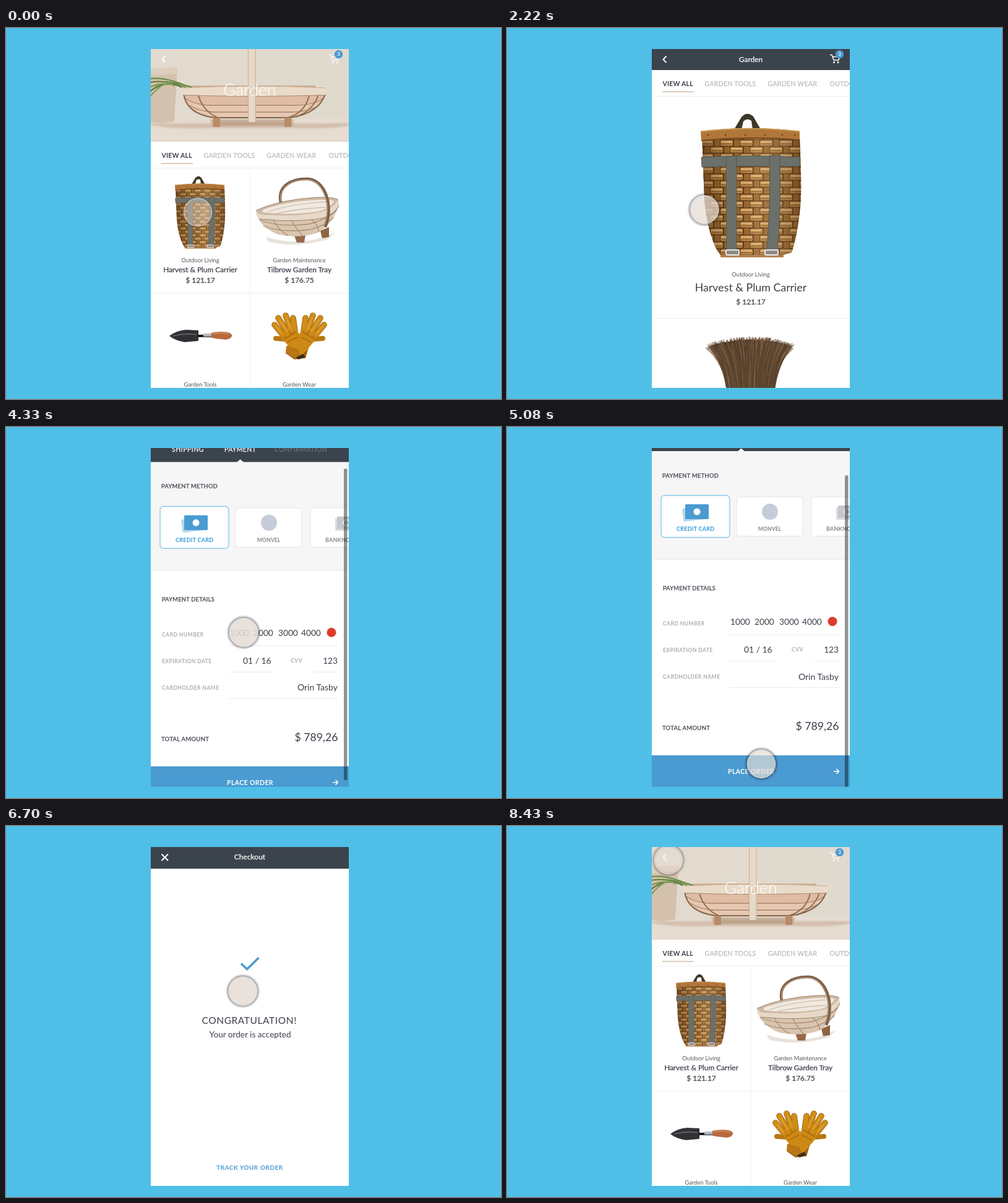
Write an HTML page that moves like this. It is 800 px wide and 600 px high and loops after 9.42 s.

```html
<!DOCTYPE html>
<html lang="en">
<head>
<meta charset="utf-8">
<title>Garden shop</title>
<style>
html, body { margin: 0; width: 100%; height: 100%; overflow: hidden; background: #4fbfe8; }
svg { display: block; width: 800px; height: 600px; }
text { font-family: Lato, "Open Sans", sans-serif; fill: currentColor; white-space: pre; }
.b { font-weight: 700; }
.l { font-weight: 300; }
.s { stroke: currentColor; stroke-width: .25px; }
.m { text-anchor: middle; }
.e { text-anchor: end; }
</style>
</head>
<body>
<svg id="stage" viewBox="0 0 800 600"></svg>
<script>
const LOOP = 9420;
const INK = '#3b4049', BAR = '#3b434d', BLUE = '#4a9bd1', WHITE = '#fff', PALE = '#bdbcbb', BEIGE = '#e6ddd4';

// ---------- markup helpers ----------
const T = (x, y, size, str, color = INK, cls = '', ls = 0) =>
  `<text x="${x}" y="${y}" font-size="${size}" color="${color}" class="${cls}" letter-spacing="${ls}">${str}</text>`;
const R = (x, y, w, h, fill, more = '') =>
  `<rect x="${x}" y="${y}" width="${w}" height="${h}" fill="${fill}" ${more}/>`;
const C = (x, y, r, fill, more = '') => `<circle cx="${x}" cy="${y}" r="${r}" fill="${fill}" ${more}/>`;
const P = (d, fill, more = '') => `<path d="${d}" fill="${fill}" ${more}/>`;
const L = (d, stroke, w = 1, more = '') =>
  `<path d="${d}" fill="none" stroke="${stroke}" stroke-width="${w}" ${more}/>`;
const ROUND = 'stroke-linecap="round" stroke-linejoin="round"';

let seed = 7;
const rnd = () => (seed = seed * 16807 % 2147483647) / 2147483647;

// ---------- shared parts ----------
const cart = alpha => `<g opacity="${alpha}">` +
  L('M522 43.5h3l3.2 8.5h7.6l2.2-5.5h-11', WHITE, 1.6) +
  C(528.5, 55.5, 1.5, WHITE) + C(535, 55.5, 1.5, WHITE) + '</g>' +
  C(537.5, 42.5, 6.7, BLUE) + T(537.5, 45.3, 8, '3', WHITE, 'b m');
const back = L('M257.5 45.5l-5 5.3 5 5.3', WHITE, 2);
const cross = L('M251.5 45.5l10.5 10.5M262 45.5l-10.5 10.5', WHITE, 2);
const topBar = h => R(234, 14, 320, h - 14, BAR);

const tabs = y => R(234, y - 22, 320, 42, WHITE) +
  T(251.5, y + 4, 10.5, 'VIEW ALL', INK, 'b', .2) +
  T(319.5, y + 4, 10.5, 'GARDEN TOOLS', PALE, 's', .3) +
  T(421.5, y + 4, 10.5, 'GARDEN WEAR', PALE, 's', .3) +
  T(521.5, y + 4, 10.5, 'OUTDOOR', PALE, 's', .3) +
  R(251, y + 12.4, 51, 1.4, '#cdb9a2') + R(234, y + 20, 320, 1, '#efefef');

// Pack basket in a 162 x 234 box
const BODY = 'M2 38H160Q163 100 162 140Q158 195 147 226L134 230H32L26 222Q10 190 6 140Z';
function basket() {
  const dots = [12, 40, 72, 104, 132, 152].map(x => C(x, 36, 1.2, '#5d3a18')).join('');
  const strap = d => P(d, '#6c706a') + L(d, '#50544f', .8);
  const buckle = x => R(x, 222, 21, 8, '#8b8b87', 'rx="2" stroke="#e8e8e8" stroke-width="2"');
  return R(32, 222, 102, 12, '#b58252') + P('M54 27L66 7Q75 -3 85 6L97 27H84L82 13Q75 8 69 14L66 27Z', '#3c3727') +
    P(BODY, 'url(#weave)') + P(BODY, 'url(#round)') +
    P('M0 30Q80 20 160 30L160 44Q80 38 1 46Z', '#b0763a') +
    L('M0 30.5Q80 21 160 30.5', '#c99653', 2) + L('M1 45Q80 37 160 44', '#6a3f16', 1.5) + dots +
    strap('M1 72Q80 67 160 72V87Q80 85 2 88Z') +
    strap('M41 70H58L58 226H42Z') + strap('M111 69H128Q130 150 124 228H106Q114 150 111 69Z') +
    buckle(41) + buckle(104);
}

function hero() {
  const leaf = (y, x2, y2, c) => L(`M232 ${y}Q258 ${y2 - 14} ${x2} ${y2}`, c, 2.3);
  const HULL = 'M286 104C288 128 306 141 336 145H458C492 141 512 126 517 104Z';
  return R(234, 14, 320, 170, '#e2dacf') + R(404, 14, 150, 136, '#ded9cf', 'opacity=".7"') +
    P('M234 152L554 146V184H234Z', '#e7dcd1') +
    P('M234 154H554V158Q520 164 470 162H330Q270 164 234 157Z', '#c3a790', 'opacity=".55" filter="url(#soft)"') +
    P('M330 148H465L462 158H334Z', '#a88568', 'opacity=".55" filter="url(#soft)"') +
    P('M234 66L277 64L272 151Q252 156 234 152Z', '#d3c1ae') + P('M234 66L277 64L276 74L234 77Z', '#ddcdbc') +
    leaf(88, 305, 97, '#64833f') + leaf(96, 296, 98, '#7b994c') + leaf(103, 284, 96, '#587637') +
    leaf(112, 272, 94, '#7f9f5b') + leaf(82, 290, 93, '#6d8d4a') +
    P(HULL, '#e6c8b2') + P('M300 93H500L500 101H300Z', '#cfae93') +
    P('M289 112Q300 122 330 124H470Q504 122 514 112L517 104H286Z', '#dfbda4') +
    L('M290 114Q304 124 330 125H470Q500 124 512 114', '#a98466', 1.4) +
    L('M297 125Q312 135 336 136H462Q492 135 505 125', '#a98466', 1.4) +
    L('M311 109Q318 134 342 145M490 109Q484 136 456 145M505 108Q496 134 468 144', '#94704f', 2) +
    L('M287 106C290 129 308 141 336 145H458C490 141 510 127 516 106', '#85654a', 2) +
    P('M286 97Q400 91 517 97Q521 102 517 108Q400 112 286 108Q282 102 286 97Z', '#eadbc9') +
    L('M286 108.5Q400 112.5 517 108.5', '#a98a6e', 1.2) + L('M286 97Q400 91 517 97', '#c9ae94', 1) +
    R(335, 145, 11, 15, '#b98a68') + R(450, 145, 11, 15, '#b98a68') +
    R(391, 14, 12.5, 138, '#e6d9c8') + L('M391.5 14V152M403 14V152', '#c6ad94', 1) +
    C(397, 97, 1, '#a98b70') + C(397, 107, 1, '#a98b70');
}

function tray() {
  return P('M420 338Q480 356 532 330L520 342Q470 356 424 346Z', '#ddd6ce', 'opacity=".7"') +
    P('M466 336L484 334L482 347H470Z', '#96694a') + P('M508 328L522 322V338L511 340Z', '#8d6442') +
    P('M405 300Q410 322 440 334Q474 341 504 331Q530 316 538 284L500 300Z', '#d9c5af') +
    L('M409 310Q440 323 490 317Q520 309 535 294', '#a88d73', 1.3) +
    L('M416 320Q446 332 492 326Q516 319 530 306', '#a88d73', 1.3) +
    L('M432 311Q440 326 456 336M462 312Q470 326 480 337M494 310Q504 318 506 330', '#a88d73', 1.3) +
    P('M404 295Q440 278 500 274Q532 273 537 278Q536 290 518 299Q470 311 407 304Z', '#cdb9a4') +
    P('M415 294Q450 281 500 278Q526 277 530 280Q524 291 508 296Q460 304 415 298Z', '#f0e9e0') +
    L('M424 297Q470 282 524 281M436 300Q480 291 518 290', '#c8b5a2', 1.2) +
    P('M404 294Q405 301 416 302Q478 306 514 296Q532 288 537 278L538 287Q532 300 514 307Q474 315 410 309Q403 304 404 294Z', '#e7d9c8') +
    L('M410 309Q474 315 514 307Q532 300 538 287', '#a1876d', 1.2) +
    L('M404 295Q440 278 500 274Q532 273 537 278', '#a1876d', 1) +
    L('M444 282C438 254 464 243 488 244C516 246 530 288 516 322', '#7d6048', 4.6) +
    L('M444.5 281C440 255 465 244.5 488 245.5C514 248 527 288 514 320', '#b0927a', 1.8);
}

function trowel() {
  return P('M264 498Q276 489 291 488L311 489V506L290 508Q274 506 264 498Z', '#2f3134') +
    L('M270 498Q290 493 308 496', '#63666a', 1.5) + R(310, 496, 12, 4, '#17181a') +
    R(319, 494, 14, 7, '#b9bcc0', 'rx="1"') + R(319, 498, 14, 2, '#73777c') +
    P('M332 493Q345 490 358 492Q366 494 365 498Q364 503 355 504Q343 503 332 501Z', '#b9673d') +
    L('M334 495Q348 492 360 495', '#d99268', 1.5);
}

function gloves() {
  const glove = flip => {
    const tips = [[434, 480], [440, 469], [452, 465], [464, 469]];
    const base = [[448, 497], [454, 491], [461, 489], [467, 491]];
    const fingers = (c, w) => tips.map(([x, y], i) =>
      L(`M${x} ${y}L${base[i][0]} ${base[i][1]}`, c, w, ROUND)).join('');
    return `<g ${flip ? 'transform="translate(948 0) scale(-1 1)"' : ''}>` +
      fingers('#9c640e', 9.6) + L('M436 502L450 503', '#b87810', 8, ROUND) + fingers('#d08d19', 7.8) +
      P('M443 494Q452 487 466 487Q473 491 476 499L488 520L472 532L451 508Z', '#cd8815') +
      L('M450 503Q460 497 469 491M455 508Q464 503 472 500M447 494L452 501M458 490L461 496', '#99600c', 1.1) +
      L('M436 482L449 498M442 472L455 492M453 468L461 489', '#e3a634', 1.4) + '</g>';
  };
  return P('M456 512L474 506L490 514L484 534L466 536L452 526Z', '#9c610d') + glove(true) + glove(false) +
    P('M453 514L472 519L478 533L468 535L452 525Z', '#b97614') + P('M468 533L480 527L484 532L473 536Z', '#3d2c16');
}

function broom() {
  const tones = ['#3f2d1f', '#6b4d35', '#8a6848', '#55402d'];
  const strands = tones.map(() => '');
  for (let i = 0; i < 520; i++) {
    const u = rnd() * 2 - 1, n = rnd() - .5;
    strands[i % 4] += `M${(394 + u * 38).toFixed(1)} 592Q${(394 + u * 44).toFixed(1)} 540 ` +
      `${(394 + u * 68 + n * 14).toFixed(1)} ${(499 + u * u * 12 + rnd() * 10).toFixed(1)}`;
  }
  return P('M328 514Q394 494 460 514Q436 550 432 592H356Q352 550 328 514Z', '#4e3928') +
    strands.map((d, i) => L(d, tones[i], .8)).join('');
}

// ---------- screens ----------
const item = (x, y, kind, name, price) =>
  T(x, y, 9.3, kind, '#55575c', 'm') + T(x, y + 16, 11.8, name, INK, 'm s') + T(x, y + 33, 12, price, INK, 'm s');

const listPage = R(234, 14, 320, 568, WHITE) + hero() + back + cart(.85) +
  T(394, 110, 27, 'Garden', WHITE, 'l m') + tabs(206) +
  R(393.5, 227, 1, 355, '#efefef') + R(234, 428.5, 320, 1, '#efefef') +
  '<use href="#basket" transform="translate(273 239) scale(.5 .503)"/>' + tray() + trowel() + gloves() +
  item(314, 379, 'Outdoor Living', 'Harvest &amp; Plum Carrier', '$ 121.17') +
  item(474, 379, 'Garden Maintenance', 'Tilbrow Garden Tray', '$ 176.75') +
  T(314, 579.5, 9.3, 'Garden Tools', '#55575c', 'm') + T(474, 579.5, 9.3, 'Garden Wear', '#55575c', 'm');

const detailPage = R(234, 14, 320, 568, WHITE) + topBar(69) + back + cart(1) +
  T(394, 54.5, 12, 'Garden', WHITE, 'm s') + tabs(90) +
  '<use href="#basket" transform="translate(313 137)"/>' +
  T(394, 402, 9.3, 'Outdoor Living', '#55575c', 'm') +
  T(394, 426, 17.8, 'Harvest &amp; Plum Carrier', INK, 'm') +
  T(394, 446.5, 12, '$ 121.17', INK, 'm s') + R(234, 469, 320, 1, '#efefef') + broom();

function payPage() {
  const option = x => R(x, 185, 107, 63.5, WHITE, 'rx="4" stroke="#e9e4df"');
  const label = (y, s) => T(252, y, 8.6, s, '#b2aeab', 'b', .4);
  const line = (x, y, w) => R(x, y, w, 1, '#eceae8');
  const number = ['1000', '2000', '3000', '4000'].map((s, i) => T([361, 400, 440, 477][i], 392, 13.7, s)).join('');
  return R(234, 14, 320, 640, WHITE) + topBar(111) + cross + T(394, 54, 12, 'Checkout', WHITE, 'm s') +
    T(539, 54, 11, '$ 789,26', '#b6babf', 'e') + L('M288.5 72.5l4 4 7.5-7.5', BLUE, 1.7) +
    T(268, 94, 10.5, 'SHIPPING', WHITE, 's', .5) + T(353, 94, 10.5, 'PAYMENT', WHITE, 's', .35) +
    T(434, 94, 10.5, 'CONFIRMATION', '#737982', '', .4) +
    R(234, 111, 320, 174, '#f6f6f6') + R(234, 285, 320, 1.5, '#ececec') + P('M373 111.2L378.5 106.5L384 111.2Z', '#f6f6f6') +
    T(251, 153.7, 9.3, 'PAYMENT METHOD', INK, 's', .35) +
    R(249, 182.7, 111, 68, WHITE, 'rx="5.5" stroke="#74c4e6" stroke-width="1.2"') +
    R(251.5, 185.2, 106, 63, 'none', 'rx="3.5" stroke="#eef3f5"') + option(371) + option(491.5) +
    R(284, 202, 36, 21, '#b5d7ec', 'rx="1.5" transform="rotate(-7 302 212)"') +
    R(288, 197, 38, 24, BLUE, 'rx="1.5"') + C(307, 209, 5.5, WHITE) +
    T(274, 240, 9, 'CREDIT CARD', '#2d9bd8', 'b', .25) +
    C(425, 209, 13, '#c5cbd8') + T(424.5, 240, 8.6, 'MONVEL', '#85878c', 'b m', .1) +
    R(532, 202, 34, 20, '#dcdcde', 'rx="1"') + R(535, 199, 34, 20, '#c4c7cd', 'rx="1"') +
    C(550, 209, 5, 'none', 'stroke="#fff" stroke-width="1.5"') + T(516, 240, 9, 'BANKNOTES', '#85878c', 'b', .2) +
    T(252, 336, 9.3, 'PAYMENT DETAILS', INK, 's', .25) +
    label(393, 'CARD NUMBER') + label(436, 'EXPIRATION DATE') + label(479, 'CARDHOLDER NAME') +
    number + C(526, 386.5, 7.5, '#dc3b2c') + T(383, 437, 13.9, '01 / 16') +
    T(460, 435, 8.8, 'CVV', '#b2aeab', 'b', .3) + T(536, 437, 13.7, '123', INK, 'e') +
    T(536, 480.5, 14, 'Orin Tasby', INK, 'e') +
    line(360, 407.5, 177) + line(360, 450, 74) + line(496, 450, 41) + line(360, 493, 177) +
    T(251, 562, 9.6, 'TOTAL AMOUNT', INK, 's', .25) + T(536.5, 562, 17.7, '$ 789,26', INK, 'e') +
    R(234, 603, 320, 51, BLUE) + T(357, 633, 10.5, 'PLACE ORDER', WHITE, 'b', .4) +
    L('M528 629h8M532.5 625l4 4-4 4', WHITE, 1.5);
}

const donePage = R(234, 14, 320, 568, WHITE, 'id="paper"') + topBar(69) + cross +
  T(394, 54, 12, 'Checkout', WHITE, 'm s') +
  T(246, 28.5, 10, '●●●○○ MOVEXA', WHITE) + T(394, 28.5, 10, '6:25 PM', WHITE, 'm b') +
  T(525, 28.5, 10, '80%', WHITE, 'e') + R(529, 21, 17, 8, WHITE, 'rx="1.5"') +
  L('M380 222.5l9.5 9 19-18.5', BLUE, 3.6) +
  T(316.5, 320, 15.5, 'CONGRATULATION!', INK, '', .6) +
  T(394.5, 342.5, 13.6, 'Your order is accepted', INK, 'm') +
  T(340, 556, 10.2, 'TRACK YOUR ORDER', BLUE, 'b', .4);

const page = (id, body) => `<g id="${id}" clip-path="url(#pageClip)">${body}</g>`;
const brick = (x, y) => R(x, y, 20, 9, '#b98649', 'rx="2"') + R(x + 1, y + 1.5, 18, 2.4, '#deb67a') +
  R(x + 1, y + 5.5, 18, 1, '#85561f');

document.getElementById('stage').innerHTML = `<defs>
  <clipPath id="phone"><rect x="234" y="34" width="320" height="548"/></clipPath>
  <clipPath id="pageClip"><rect x="234" y="14" width="320" height="568"/></clipPath>
  <filter id="soft" x="-30%" y="-30%" width="160%" height="160%"><feGaussianBlur stdDeviation="1.8"/></filter>
  <pattern id="weave" width="32" height="22" patternUnits="userSpaceOnUse">
    ${R(0, 0, 32, 22, '#5c3814') + R(22, 0, 9, 10, '#96642e') + R(6, 11, 9, 10, '#96642e') +
      brick(0, .5) + brick(16, 11.5) + brick(-16, 11.5)}
  </pattern>
  <linearGradient id="round">
    <stop offset="0" stop-color="#3a1f08" stop-opacity=".4"/><stop offset=".3" stop-color="#3a1f08" stop-opacity="0"/>
    <stop offset=".55" stop-color="#ffe2ae" stop-opacity=".14"/><stop offset="1" stop-color="#3a1f08" stop-opacity=".35"/>
  </linearGradient>
  <g id="basket">${basket()}</g></defs>
  ${R(0, 0, 800, 600, '#4fbfe8')}
  <g clip-path="url(#phone)">${R(234, 34, 320, 548, '#000')}
    ${page('list', listPage)}${page('detail', detailPage)}
    ${page('pay', `<g id="scroll">${payPage()}</g>`)}${page('done', donePage)}
    ${R(546, 34, 5.5, 504, '#000', 'id="thumb" rx="2.5"')}
    <g id="cursor">
      <circle id="shade" r="24" fill="none" stroke="#2c2c33" stroke-width="3.2" filter="url(#soft)"/>
      <circle id="disc" r="23" fill="${BEIGE}"/>
      <circle r="22.5" fill="none" stroke="#fff" stroke-width="1.3" opacity=".45"/>
    </g></g>`;

// ---------- motion ----------
const el = {};
for (const id of ['list', 'detail', 'pay', 'done', 'scroll', 'paper', 'thumb', 'cursor', 'shade', 'disc'])
  el[id] = document.getElementById(id);

const span = (t, a, b) => Math.min(1, Math.max(0, (t - a) / (b - a)));
const smooth = p => p * p * (3 - 2 * p);
const easeOut = p => 1 - (1 - p) ** 2;
const mix = (a, b, p) => a + (b - a) * p;

// cubic-bezier(.25, .1, .25, 1)
function ease(x) {
  let lo = 0, hi = 1, s = .5;
  for (let i = 0; i < 20; i++) {
    s = (lo + hi) / 2;
    if (.75 * s * (1 - s) + s ** 3 < x) lo = s; else hi = s;
  }
  return .3 * s * (1 - s) ** 2 + 3 * (1 - s) * s * s + s ** 3;
}

// [time, disc opacity, shadow opacity]
const LOOK = [[0, .42, .1], [860, .42, .1], [920, .72, .5], [2220, .72, .5], [2610, .95, .5], [3900, .97, .5],
  [5080, .68, .55], [5500, .7, .55], [5830, .97, .55], [6460, .97, .5], [7360, .5, .5], [7610, .38, .45],
  [8430, .3, .4], [LOOP, .3, .4]];
const PRESS = [[860, 920], [3110, 3210], [5280, 5400], [7450, 7610]];

function cursorAt(t) {
  if (t < 4000) {
    const p = easeOut(span(t, 2190, 2610));
    return [mix(310, 376, p), mix(298, 268, p)];
  }
  if (t < 5900) {
    const p = smooth(span(t, 4000, 5060));
    return [mix(376, 411, p), mix(268, 545, p) + 6 * smooth(span(t, 5100, 5800))];
  }
  const p = smooth(span(t, 5900, 7360));
  return [mix(411, 261, p ** 3), mix(551, 55, p)];
}

function put(node, shown, opacity = 1, dx = 0, k = 1) {
  node.setAttribute('display', shown ? 'inline' : 'none');
  node.setAttribute('opacity', opacity);
  node.setAttribute('transform', `translate(${394 + dx} 298) scale(${k}) translate(-394 -298)`);
}

function draw(t) {
  const fade = smooth(span(t, 1340, 1790));
  const push = ease(span(t, 3540, 3880));
  const accept = smooth(span(t, 5660, 5990));
  const out = span(t, 7780, 8105), into = span(t, 8105, 8430);

  const arriving = t >= 8105;
  const inX = arriving ? 320 * (1 - ease(span(into, 0, .3))) : 0;
  const inK = arriving ? mix(.7, 1, ease(span(into, .4, 1))) : 1;
  put(el.list, fade < 1 || arriving, 1, inX, inK);
  put(el.detail, fade > 0 && push < 1, fade, -320 * push);
  put(el.pay, push > 0 && accept < 1, 1, 320 * (1 - push));
  put(el.done, accept > 0 && !arriving, accept,
    -320 * ease(span(out, .7, 1)), mix(1, .7, ease(span(out, 0, .6))));
  el.paper.setAttribute('fill', t < 7790 ? WHITE : BEIGE);

  const scroll = t < 5500 ? smooth(span(t, 4020, 4480)) : 0;
  el.scroll.setAttribute('transform', `translate(0 ${-72 * scroll})`);
  el.thumb.setAttribute('y', 34 + 44 * scroll);
  el.thumb.setAttribute('opacity', .42 * span(t, 4020, 4110) * (1 - span(t, 5150, 5430)));

  const [x, y] = cursorAt(t);
  const pressed = PRESS.some(([a, b]) => t >= a && t < b);
  el.cursor.setAttribute('transform', `translate(${x} ${y}) scale(${pressed ? .93 : 1})`);
  const i = LOOK.findIndex(k => k[0] > t), a = LOOK[i - 1], b = LOOK[i];
  const p = span(t, a[0], b[0]);
  el.disc.setAttribute('opacity', mix(a[1], b[1], p));
  el.shade.setAttribute('opacity', mix(a[2], b[2], p));
}

const start = performance.now();
function tick() {
  draw((performance.now() - start) % LOOP);
  requestAnimationFrame(tick);
}
tick();
</script>
</body>
</html>
```
